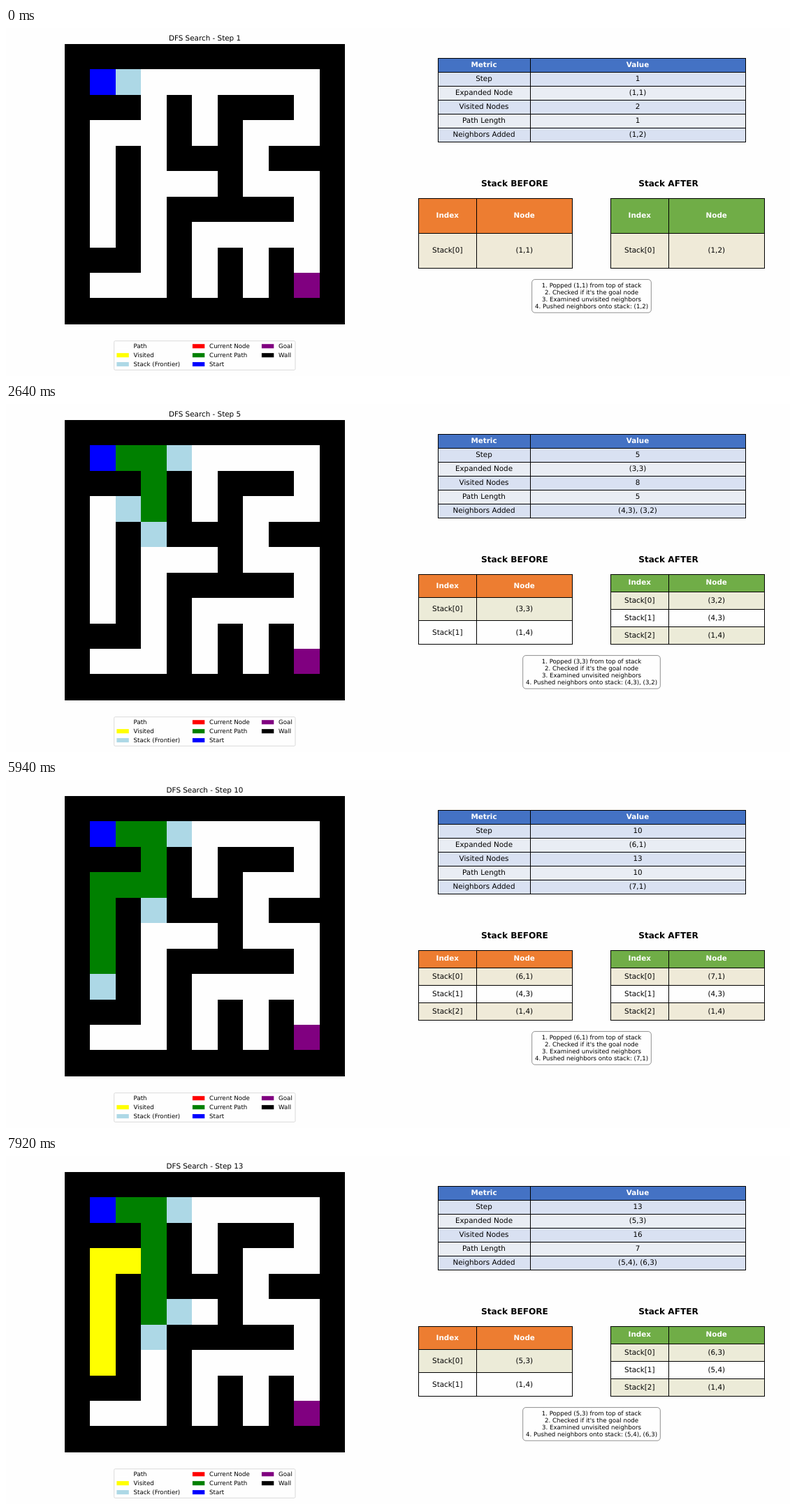
Recreate the animation shown at these times as an HTML page with a canvas. Size 1122 by 499 pixels, loop 8000 ms.

```html
<!DOCTYPE html>
<html lang="en">
<head>
<meta charset="utf-8">
<title>DFS Search</title>
<style>
  html, body { margin: 0; width: 100%; height: 100%; overflow: hidden; background: #fefefe; }
  canvas { display: block; }
</style>
</head>
<body>
<canvas id="stage" width="1122" height="499"></canvas>
<script>
const ctx = document.getElementById('stage').getContext('2d');
const PAPER = '#fefefe';
const PT = 1122 / 1296;
const STEP_MS = 660, LOOP_MS = 8000, STEPS = 13;

const MAZE = [
  '###########',
  '#.........#',
  '###.#.###.#',
  '#...#.#...#',
  '#.#.###.###',
  '#.#...#...#',
  '#.#.#####.#',
  '#.#.#.....#',
  '###.#.#.#.#',
  '#...#.#.#.#',
  '###########'
];
const START = '1,1', GOAL = '9,9';
const MOVES = [[0, 1], [1, 0], [0, -1], [-1, 0]];

const COLORS = {
  path: PAPER, visited: '#ffff00', frontier: '#add8e6', current: '#ff0000',
  route: '#008000', start: '#0000ff', goal: '#800080', wall: '#000000'
};
const LEGEND = [
  [158.4, [['Path', 'path'], ['Visited', 'visited'], ['Stack (Frontier)', 'frontier']]],
  [266.9, [['Current Node', 'current'], ['Current Path', 'route'], ['Start', 'start']]],
  [365.9, [['Goal', 'goal'], ['Wall', 'wall']]]
];

// Depth-first search; stacks are stored with the top at index 0.
function search() {
  const parent = { [START]: null };
  const steps = [];
  let stack = [START];
  while (stack.length && steps.length < STEPS) {
    const before = stack;
    const node = stack[0];
    const [r, c] = node.split(',').map(Number);
    const added = [];
    for (const [dr, dc] of MOVES) {
      const next = `${r + dr},${c + dc}`;
      if (MAZE[r + dr][c + dc] === '.' && !(next in parent)) {
        parent[next] = node;
        added.push(next);
      }
    }
    stack = [...added].reverse().concat(before.slice(1));
    const route = [];
    for (let n = node; n; n = parent[n]) route.push(n);
    steps.push({ node, before, after: stack, added, route, visited: Object.keys(parent) });
  }
  return steps;
}

const steps = search();
const show = node => `(${node})`;

function text(str, x, y, pt, { bold = false, color = '#000', align = 'center' } = {}) {
  ctx.font = `${bold ? 'bold ' : ''}${pt * PT}px "DejaVu Sans", sans-serif`;
  ctx.fillStyle = color;
  ctx.textAlign = align;
  ctx.fillText(str, x, y);
}

function box(x, y, w, h, radius, stroke) {
  ctx.beginPath();
  ctx.roundRect(x, y, w, h, radius);
  ctx.fillStyle = PAPER;
  ctx.fill();
  ctx.strokeStyle = stroke;
  ctx.lineWidth = PT;
  ctx.stroke();
}

// Table with a bold header row and two alternating row fills.
function table(xs, top, height, rows, headFill, fills) {
  const rowH = height / rows.length;
  const snap = v => Math.floor(v) + 0.5;
  ctx.strokeStyle = '#000';
  ctx.lineWidth = 1;
  rows.forEach((row, i) => {
    const y = top + i * rowH;
    row.forEach((str, j) => {
      const x0 = snap(xs[j]), x1 = snap(xs[j + 1]);
      const y0 = snap(y), y1 = snap(y + rowH);
      ctx.fillStyle = i ? fills[(i - 1) % 2] : headFill;
      ctx.fillRect(x0, y0, x1 - x0, y1 - y0);
      ctx.strokeRect(x0, y0, x1 - x0, y1 - y0);
      text(str, (xs[j] + xs[j + 1]) / 2, y + rowH / 2 + 2.9, 12,
        i ? {} : { bold: true, color: '#fff' });
    });
  });
}

const edgeX = c => Math.round(84 + 36.45 * c);
const edgeY = r => Math.round(22.9 + 36.45 * r);

function cellKind(key, step) {
  if (key === START) return 'start';
  if (key === GOAL) return 'goal';
  if (step.route.includes(key)) return 'route';
  if (step.after.includes(key)) return 'frontier';
  return step.visited.includes(key) ? 'visited' : 'path';
}

function drawMaze(step) {
  ctx.fillStyle = COLORS.wall;
  ctx.fillRect(84, 23, 401, 402);
  MAZE.forEach((row, r) => [...row].forEach((ch, c) => {
    if (ch === '#') return;
    ctx.fillStyle = COLORS[cellKind(`${r},${c}`, step)];
    ctx.fillRect(edgeX(c), edgeY(r), edgeX(c + 1) - edgeX(c), edgeY(r + 1) - edgeY(r));
  }));
}

function drawLegend() {
  box(154.7, 448.7, 259.3, 41.7, 1.7, '#d6d6d6');
  for (const [x, items] of LEGEND) {
    items.forEach(([label, kind], i) => {
      const y = 459.3 + 12.95 * i;
      ctx.fillStyle = COLORS[kind];
      ctx.fillRect(x, y - 6.1, 17.4, 6.1);
      text(label, x + 24.2, y, 10, { align: 'left' });
    });
  }
}

// Both stack tables share one tint, blended by their tinted areas.
function stackTint({ before, after }) {
  const area = s => Math.ceil(s.length / 2) / (s.length + 1);
  const k = area(after) / (area(before) + area(after));
  const mix = (a, b) => Math.round(a + (b - a) * k);
  return `rgb(${mix(251, 226)},${mix(229, 239)},${mix(214, 218)})`;
}

function drawStack(title, titleX, x, stack, headFill, tint) {
  text(title, titleX, 227.3, 14, { bold: true });
  const rows = [['Index', 'Node'], ...stack.map((n, i) => [`Stack[${i}]`, show(n)])];
  table([x, x + 82.5, x + 220], 244, 100.4, rows, headFill, [tint, PAPER]);
}

function drawNotes(step, added) {
  const lines = [
    `1. Popped ${show(step.node)} from top of stack`,
    "2. Checked if it's the goal node",
    '3. Examined unvisited neighbors',
    added ? `4. Pushed neighbors onto stack: ${added}` : '4. No new neighbors to add'
  ];
  ctx.font = `${10 * PT}px "DejaVu Sans", sans-serif`;
  const w = Math.max(...lines.map(s => ctx.measureText(s).width)) + 10 * PT;
  box(838 - w / 2, 360.6, w, 47.6, 5 * PT, '#808080');
  lines.forEach((s, i) => text(s, 838, 372 + 10.03 * i, 10));
}

function draw(index) {
  const step = steps[index];
  const added = step.added.map(show).join(', ');
  ctx.fillStyle = PAPER;
  ctx.fillRect(0, 0, 1122, 499);
  ctx.textRendering = 'geometricPrecision';

  text(`DFS Search - Step ${index + 1}`, 284.5, 18, 12);
  drawMaze(step);
  drawLegend();

  table([618, 750, 1058], 43.2, 120.3, [
    ['Metric', 'Value'],
    ['Step', index + 1],
    ['Expanded Node', show(step.node)],
    ['Visited Nodes', step.visited.length],
    ['Path Length', step.route.length],
    ['Neighbors Added', added || 'None (all neighbors already visited)']
  ], '#4472c4', ['#d9e1f2', '#e9edf4']);

  const tint = stackTint(step);
  drawStack('Stack BEFORE', 728, 590.5, step.before, '#ed7d31', tint);
  drawStack('Stack AFTER', 948, 865.5, step.after, '#70ad47', tint);
  drawNotes(step, added);
}

let shown = -1;
function tick() {
  const index = Math.floor((performance.now() % LOOP_MS) / STEP_MS);
  if (index !== shown) draw(shown = index);
  requestAnimationFrame(tick);
}
tick();
</script>
</body>
</html>
```
